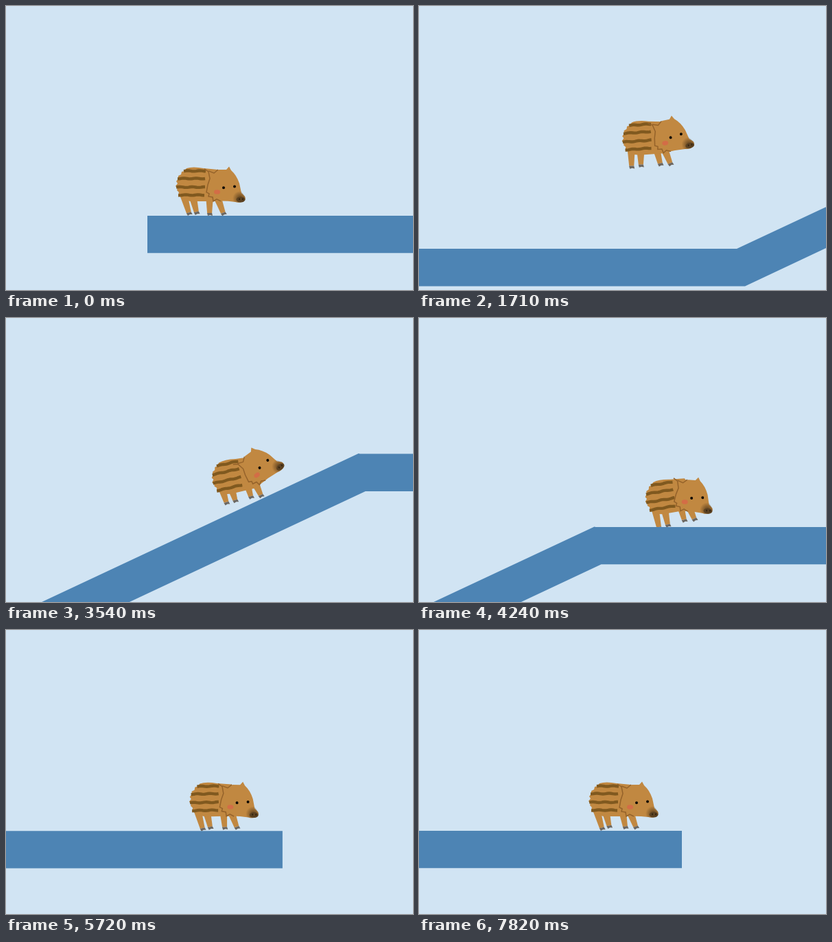
An HTML page with a canvas for the animation above (7920 ms loop, 593 by 413 pixels).

```html
<!DOCTYPE html>
<html lang="en">
<head>
<meta charset="utf-8">
<title>Running boar piglet</title>
<style>
html, body { margin: 0; width: 100%; height: 100%; overflow: hidden; background: #d1e4f3; }
canvas { display: block; }
</style>
</head>
<body>
<canvas id="stage" width="593" height="413"></canvas>
<script>
const g = document.getElementById('stage').getContext('2d');
const LOOP = 7920, LAG = 158, STEP = 10;
const FUR = '#c18841', DARK = '#80591f', LINE = '#94622a', HOOF = '#6c6761';
const clamp = (v, a = 0, b = 1) => Math.min(b, Math.max(a, v));
const rad = d => d * Math.PI / 180;

// Camera path: time, camera x, distance the boar runs ahead of the camera
const TRACK = [[0, 0, 0], [830, 69, 30], [1120, 144, 56], [2250, 483, 32], [3540, 836, 52],
  [4240, 1094, 82], [4940, 1369, 28], [5600, 1526, 41], [5720, 1547, 20], [5780, 1553.3, 13.7],
  [6100, 1565, 2], [6600, 1567, 0], [LOOP, 1567, 0]];
const TILT = [[0, 0], [1480, 0], [1700, -8], [2000, -12], [2250, -31], [2600, -25],
  [3800, -25], [4240, -3], [4400, 0], [LOOP, 0]];
// Jumps: start, duration, height
const JUMPS = [[1480, 740, 138], [3840, 440, 57], [4570, 370, 33]];

function span(keys, t) {
  const i = Math.max(1, keys.findIndex(k => k[0] >= t));
  const a = keys[i - 1], b = keys[i], d = b[0] - a[0];
  return [a, b, d, (t - a[0]) / d];
}

function tiltAt(t) {
  const [a, b, , u] = span(TILT, t);
  return a[1] + (b[1] - a[1]) * u;
}

// Hermite curve; the lead is proportional to the camera's speed
function trackAt(t) {
  const [a, b, d, u] = span(TRACK, t);
  const m = a[2] * d / LAG, n = b[2] * d / LAG, rise = b[1] - a[1];
  const p = 3 * rise - 2 * m - n, q = m + n - 2 * rise;
  return { x: a[1] + u * (m + u * (p + u * q)), lead: LAG / d * (m + u * (2 * p + 3 * u * q)) };
}

// The front feet meet the slope a little before the boar's middle does
const ground = x => clamp((x - 791) * 0.467, 0, 254);

function heightAt(t) {
  const at = time => { const k = trackAt(time); return ground(298 + k.x + k.lead); };
  let h = at(t);
  for (const [start, time, top] of JUMPS) {
    const u = (t - start) / time;
    if (u > 0 && u < 1) h = Math.max(h, at(start) + 4 * top * u * (1 - u));
  }
  return h;
}

// The camera follows the boar's height with a delay
const camY = [13];
for (let t = 0; t <= LOOP; t += STEP) {
  const y = camY[camY.length - 1];
  camY.push(y + (heightAt(t) - y) * (1 - Math.exp(-STEP / LAG)));
}
function camYAt(t) {
  const i = Math.floor(t / STEP);
  return camY[i] + (camY[i + 1] - camY[i]) * (t / STEP - i);
}

function shape(points, fill, stroke, width = 1.2) {
  const path = new Path2D('M' + points);
  if (fill) { g.fillStyle = fill; g.fill(path); }
  if (stroke) { g.strokeStyle = stroke; g.lineWidth = width; g.stroke(path); }
}

function dot(x, y, rx, ry, fill) {
  g.fillStyle = fill;
  g.beginPath();
  g.ellipse(x, y, rx, ry, 0, 0, 7);
  g.fill();
}

function leg(x, y, angle, length) {
  g.save();
  g.translate(x, y);
  g.rotate(rad(-angle));
  shape(`-6,-8 L6,-8 L3.6,${length - 4} L-3.4,${length - 4} Z`, FUR);
  shape(`-3.6,${length - 4} L3.6,${length - 4} L4.5,${length} L1,${length - 1} L-2.5,${length} Z`, HOOF);
  g.restore();
}

function stripe(x0, x1, y, seed) {
  g.beginPath();
  for (let x = x0; x <= x1; x += 2) {
    g.lineTo(x, y + Math.sin(x * 0.35 + seed) * 0.5);
  }
  g.strokeStyle = DARK;
  g.lineWidth = 4.4;
  g.stroke();
}

function turn(x, y, angle) {
  g.translate(x, y);
  g.rotate(rad(angle));
  g.translate(-x, -y);
}

function body() {
  shape('263,236 Q272,233 288,236 L309,238 L322,260 L306,284 L278,284 Q266,285 256,280 ' +
    'L254,277 L251,275 L252,271 L249,268 L250,264 L247,262 L250,258 L248,255 L251,251 ' +
    'L251,247 L255,245 L256,241 L260,240 Z', FUR);
  stripe(259, 291, 240, 0);
  stripe(250, 291, 251, 2);
  stripe(248, 290, 263.5, 4);
  stripe(251, 289, 275, 1);
}

function head() {
  shape('295,241 L303,242 L310,238 L321,238 L325,233.5 L328,239 Q336,246 340,258 ' +
    'L343,272 L348,277 Q350,281 346,284 Q341,287 334,285 Q318,283 302,284 L301,279 ' +
    'L295,278 L296,273 L291,271 L295,258 L297,252 Z', FUR);
  shape('289,237 L295,241 L297,251 L294,260 L292,271 L296,273 L295,277 L301,278 L302,284 ' +
    'L307,281 L313,284', null, LINE, 1.5);
  shape('295,240 L303,243 L309,238', null, LINE, 1.4);
  const glow = g.createRadialGradient(341, 280, 2, 341, 280, 11);
  glow.addColorStop(0, 'rgba(80,55,25,.75)');
  glow.addColorStop(1, 'rgba(80,55,25,0)');
  g.save();
  g.clip(new Path2D('M328,268 L342,268 L348,277 Q350,281 346,284 Q341,287 334,285 L326,284 Z'));
  dot(341, 280, 11, 11, glow);
  g.restore();
  dot(342, 281.5, 6.5, 4, '#5b4121');
  dot(340, 281, 1, 1.4, '#33230f');
  dot(345, 281, 1, 1.4, '#33230f');
  dot(307.5, 270.5, 4.5, 3.2, 'rgba(216,100,72,.75)');
  dot(317, 264.3, 2, 2, '#0d0904');
  dot(333, 262.6, 2, 2, '#0d0904');
}

function boar(t, x, y, lead) {
  const run = clamp((lead - 15) / 30);
  const phase = (t - 1120) / 484 * 2 * Math.PI;
  const s = run * (0.2 + 0.8 * Math.cos(phase));
  const swing = run * 7 * Math.sin(phase);
  const idle = (1 - run) * (1 - Math.cos(t / 447 * 2 * Math.PI)) / 2;
  const tuck = 1 - 0.25 * Math.max(0, s);
  const raise = 1 - 0.25 * Math.max(0, -s);

  g.save();
  g.translate(x - 298, y - 305 + 4 * s);
  turn(298, 262, tiltAt(t) + 12 * s);
  leg(273, 281, 13 - 9 * run - swing, (23 - 2 * idle) * tuck);
  leg(309, 281, 20 - 9 * run + swing, (25 - 2 * idle) * tuck * raise);
  leg(259.5, 277, 16 - 12 * run - swing, 28.5 * tuck);
  leg(296.5, 277, 10 * idle + 3 * run + swing, (28 - 2 * idle) * tuck * raise);
  body();
  turn(300, 255, -24 * s);
  head();
  g.restore();
}

function draw(now) {
  const t = now % LOOP;
  const { x, lead } = trackAt(t);
  const y = camYAt(t);
  g.fillStyle = '#d1e4f3';
  g.fillRect(0, 0, 593, 413);
  boar(t, 298 + lead, 292 + y - heightAt(t), lead);
  g.save();
  g.translate(-x, y);
  shape('206,292 L806,292 L1350,37.4 L1352,38 L1950,38 L1950,92.3 L1360,92.3 L818,346.3 L206,346.3 Z', '#4d84b4');
  g.restore();
}

const start = performance.now();
function frame() {
  draw(performance.now() - start);
  requestAnimationFrame(frame);
}
frame();
</script>
</body>
</html>
```
